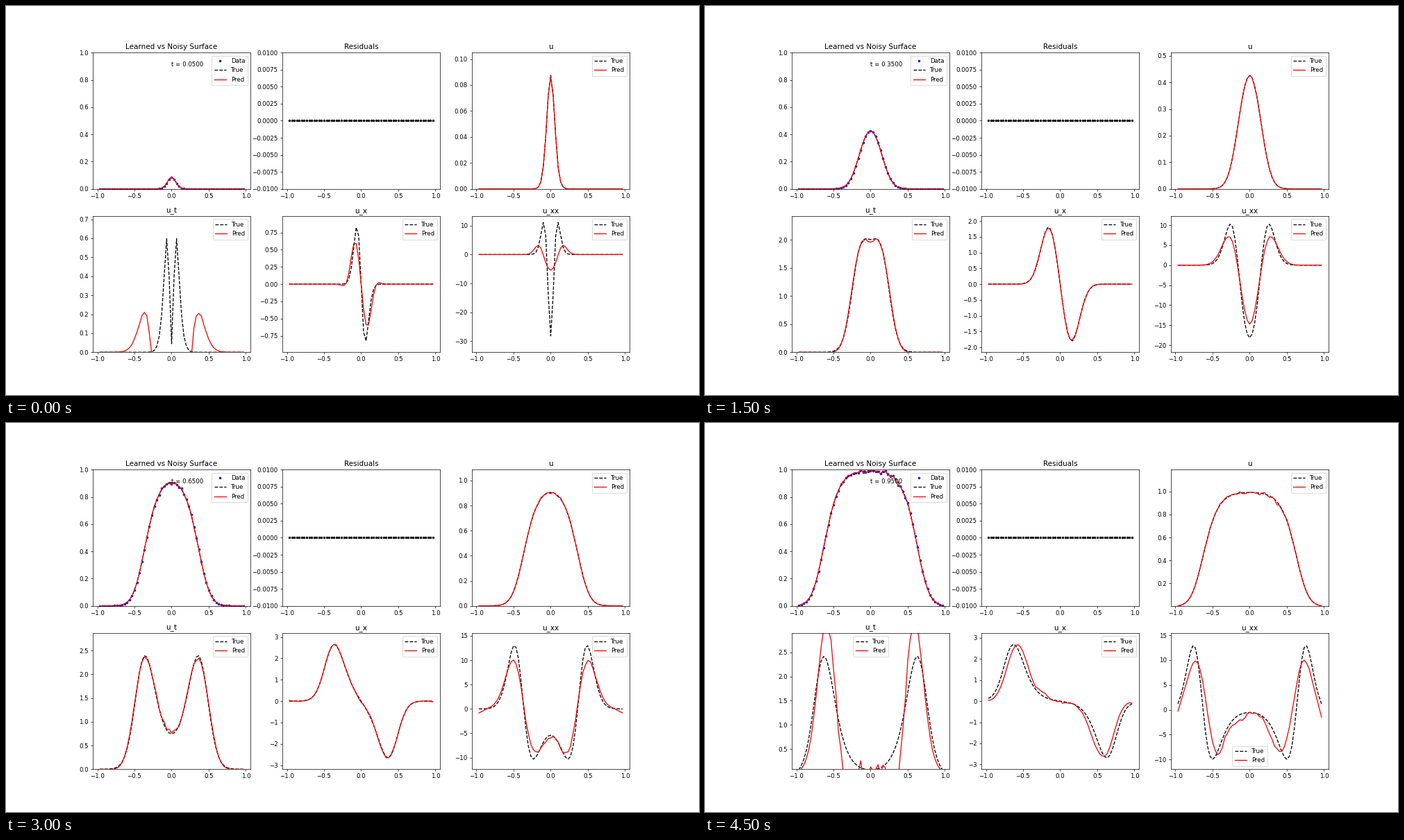
A matplotlib script for the animation above (5 s loop, 998 px wide and 561 px high).

```python
import numpy as np
import matplotlib.pyplot as plt
from matplotlib.animation import FuncAnimation

DPI = 62.375
DX, DT = 1 / 30, 0.05
DIFF, RATE = 0.0228, 10.0     # diffusion and logistic growth
SUB = 20                      # integration steps per stored time
WIN = 11                      # points in each local polynomial fit
NOISE = 0.007                 # relative measurement error
LATE = 14                     # rows from here use the previous row's slopes

x_all = np.linspace(-1, 1, 61)
x = x_all[1:-1]
t = DT * np.arange(1, 20)


def slope_x(u):
    return (u[..., 2:] - u[..., :-2]) / (2 * DX)


def bend_x(u):
    return (u[..., 2:] + u[..., :-2] - 2 * u[..., 1:-1]) / DX**2


def growth(u):
    """Diffusion plus logistic growth with fixed ends."""
    du = np.zeros_like(u)
    du[1:-1] = DIFF * bend_x(u) + RATE * u[1:-1] * (1 - u[1:-1])
    return du


def solve():
    u = 0.1 * np.exp(-x_all**2 / (2 * 0.03**2))
    rows, h = [u], DT / SUB
    for _ in range(20):
        for _ in range(SUB):
            k1 = growth(u)
            k2 = growth(u + h / 2 * k1)
            k3 = growth(u + h / 2 * k2)
            k4 = growth(u + h * k3)
            u = u + h / 6 * (k1 + 2 * k2 + 2 * k3 + k4)
        rows.append(u)
    return np.array(rows)


def poly_diff(n, step):
    """Matrices for first and second derivatives from local cubic fits."""
    d1, d2 = np.zeros((n, n)), np.zeros((n, n))
    for i in range(n):
        a = min(max(i - WIN // 2, 0), n - WIN)
        cols = np.arange(a, a + WIN)
        fit = np.linalg.pinv(np.vander((cols - i) * step, 4, increasing=True))
        d1[i, cols] = fit[1]
        d2[i, cols] = 2 * fit[2]
    return d1, d2


full = solve()
mid = full[1:-1]
true = {
    "u": mid[:, 1:-1],
    "u_t": (full[2:, 1:-1] - full[:-2, 1:-1]) / (2 * DT),
    "u_x": slope_x(mid),
    "u_xx": bend_x(mid),
}

rng = np.random.default_rng(4)
data = true["u"] * (1 + NOISE * rng.standard_normal(true["u"].shape))
lagged = data.copy()
lagged[LATE:] = data[LATE - 1:-1]
x1, x2 = poly_diff(len(x), DX)
t1, _ = poly_diff(len(t), DT)
pred = {"u": data, "u_t": t1 @ data, "u_x": lagged @ x1.T, "u_xx": lagged @ x2.T}

fig, axes = plt.subplots(2, 3, figsize=(998 / DPI, 561 / DPI), dpi=DPI)
fig.subplots_adjust(left=0.125, right=0.9, bottom=0.11, top=0.88,
                    wspace=0.2, hspace=0.2)
surface, resid = axes[0, :2]
panels = dict(zip(true, [axes[0, 2], *axes[1]]))


def draw_pair(ax, name, row):
    ax.plot(x, true[name][row], "k--", label="True")
    ax.plot(x, pred[name][row], "r", label="Pred")


def limits(vals):
    """Range with a margin; a bottom within half a pixel of zero snaps to it."""
    low, high = 1.2 * vals.min(), 1.2 * vals.max()
    return (0 if abs(low) < 0.0025 * high else low), high


def update(k):
    row = 2 * k
    for ax in axes.flat:
        ax.clear()

    surface.plot(x, data[row], "b.", label="Data")
    draw_pair(surface, "u", row)
    surface.text(0, 0.9, f"t = {t[row]:.4f}")
    surface.set_ylim(0, 1)
    surface.set_title("Learned vs Noisy Surface")
    surface.legend(loc="upper right")

    resid.plot(x, data[row] - pred["u"][row], "k.")
    resid.set_ylim(-0.01, 0.01)
    resid.set_title("Residuals")

    for name, ax in panels.items():
        draw_pair(ax, name, row)
        ax.set_ylim(*limits(true[name][row]))
        ax.set_title(name)
        ax.legend(loc="best")
    return []


anim = FuncAnimation(fig, update, frames=10, interval=500,
                     repeat=True, repeat_delay=0, blit=False)
plt.show()
```
